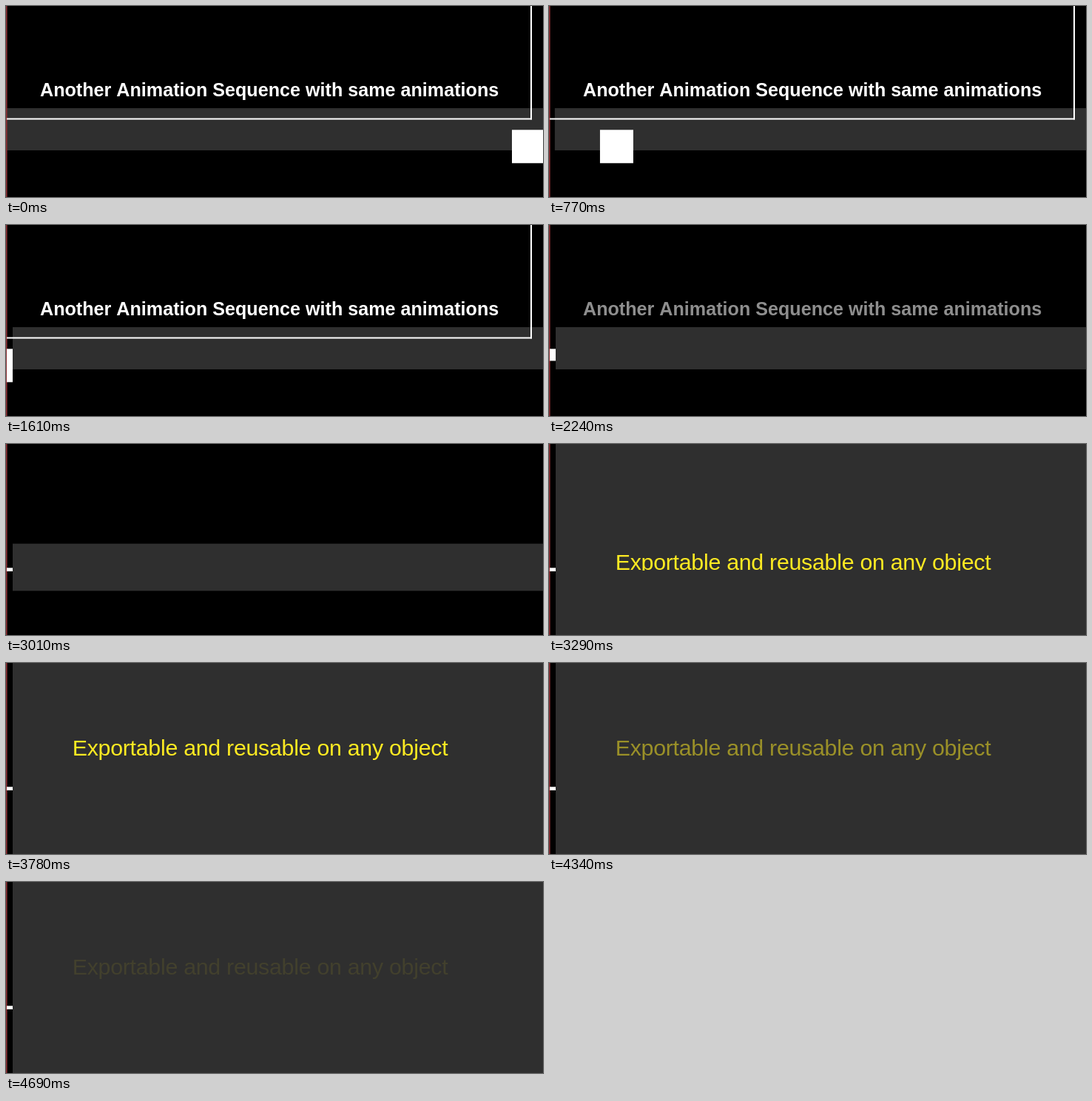
Animation of 726x258 px, one loop 4760 ms. Source, as an HTML page with a canvas:

```html
<!DOCTYPE html>
<html lang="en">
<head>
<meta charset="utf-8">
<title>Animation sequence</title>
<style>
  html, body { margin: 0; width: 100%; height: 100%; overflow: hidden; background: #000; }
  canvas { display: block; }
</style>
</head>
<body>
<canvas id="stage" width="726" height="258"></canvas>
<script>
const W = 726, H = 258, LOOP = 4760, STEP = 70;
const ctx = document.getElementById('stage').getContext('2d');

// CSS-style cubic-bezier timing function, solved by bisection
function bezier(x1, y1, x2, y2) {
  const curve = (a, b, s) => 3 * a * s * (1 - s) ** 2 + 3 * b * s * s * (1 - s) + s ** 3;
  return x => {
    let lo = 0, hi = 1;
    for (let i = 0; i < 24; i++) {
      const mid = (lo + hi) / 2;
      if (curve(x1, x2, mid) < x) lo = mid; else hi = mid;
    }
    return curve(y1, y2, lo);
  };
}
const ease = bezier(.25, .1, .25, 1);
const easeIn = bezier(.42, 0, 1, 1);
const easeInOut = bezier(.42, 0, .58, 1);

function tween(t, start, duration, from, to, easing = ease) {
  const p = (t - start) / duration;
  if (p <= 0) return from;
  if (p >= 1) return to;
  return from + (to - from) * easing(p);
}

function rect(color, x, y, w, h) {
  ctx.fillStyle = color;
  ctx.fillRect(x, y, w, h);
}

function label(text, font, spacing, color, x, y, alpha) {
  ctx.globalAlpha = alpha;
  ctx.font = font + ' "Liberation Sans", Arial, sans-serif';
  ctx.letterSpacing = spacing;
  ctx.fillStyle = color;
  ctx.fillText(text, x, y);
  ctx.globalAlpha = 1;
}

function clipped(x, y, w, h, paint) {
  ctx.save();
  ctx.beginPath();
  ctx.rect(x, y, w, h);
  ctx.clip();
  paint();
  ctx.restore();
}

function draw(t) {
  rect('#000', 0, 0, W, H);

  label('Another Animation Sequence with same animations', 'bold 25.15px', '0px', '#fff',
    46, 122, tween(t, 1640, 980, 1, 0, easeIn));

  // Band, later stretched over the whole height
  const bandX = tween(t, 212, 1000, 1, 9);
  const grow = tween(t, 2988, 1000, 0, 300);
  rect('#2f2f2f', bandX, 138 - grow, W - bandX, 57 + 2 * grow);

  rect('#8a2f33', 0, 0, 1.6, H);

  clipped(1, 0, W, H, () => {
    // Corner lines
    const rest = tween(t, 1610, 600, 1, 0);
    rect('#fff', 709, 0, 2, 153.5 * rest);
    rect('#fff', 0, 151.5, 711 * rest, 2);

    // White block slides left, then flattens
    rect('#fff', tween(t, 212, 1000, 684, -36), 167.3, 45,
      tween(t, 1610, 1000, 45, 4.7, easeInOut));
  });

  // Caption rises out of a mask
  if (t > 2988) clipped(9, 90, W, 81, () =>
    label('Exportable and reusable on any object', '30.4px', '-0.3px', '#fdea22',
      89.7, tween(t, 2990, 700, 197, 125, easeInOut), tween(t, 4058, 1000, 1, 0)));
}

function frame() {
  const t = performance.now() % LOOP;
  draw(Math.floor(t / STEP) * STEP);
  requestAnimationFrame(frame);
}
frame();
</script>
</body>
</html>
```
